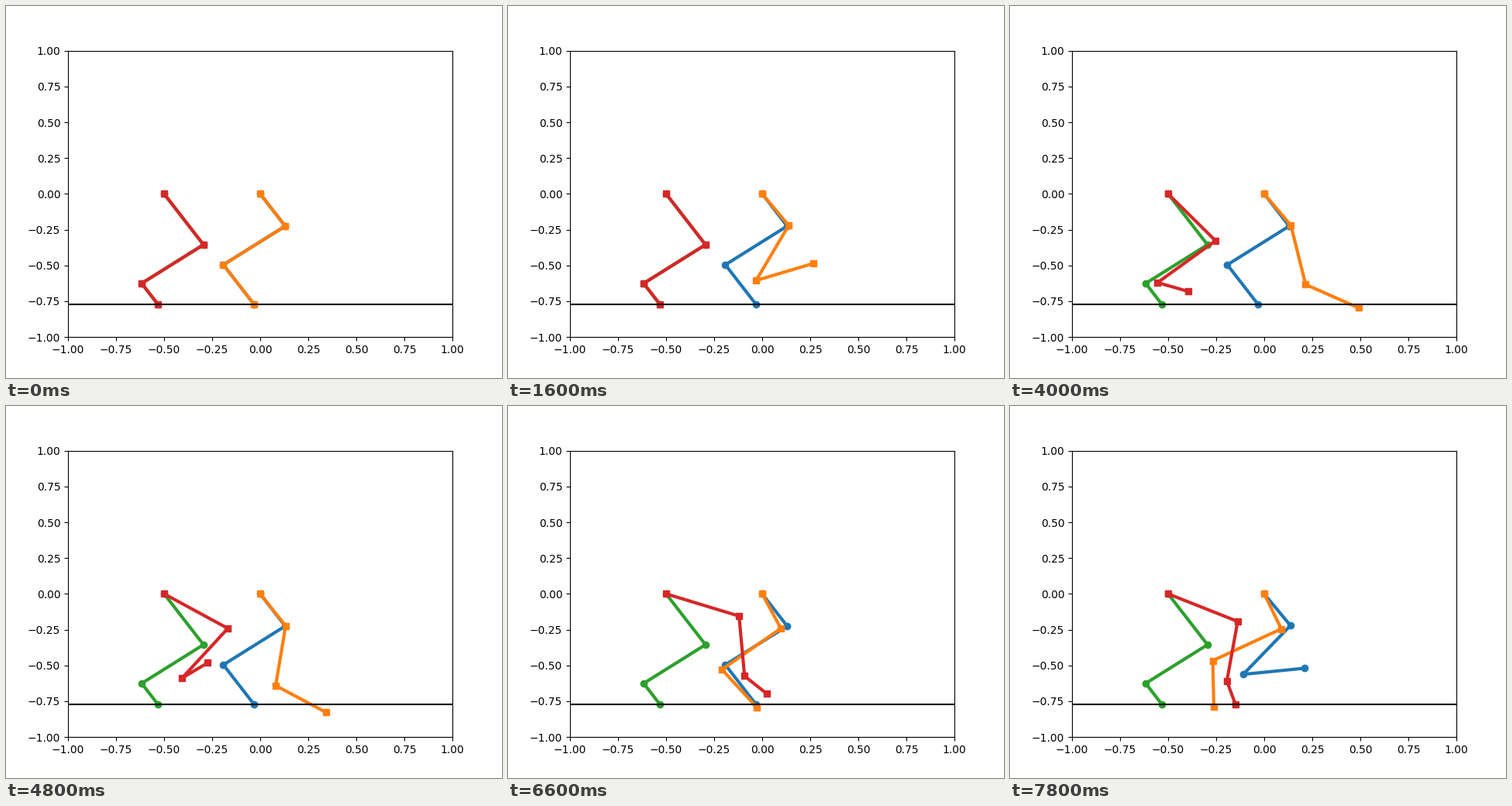
These frames come from a looping animation (640x480 px, 8 s). A matplotlib script:

```python
import numpy as np
import matplotlib.pyplot as plt
from matplotlib.animation import FuncAnimation

FRAMES, STEP_MS = 40, 200
QUARTER = 16  # steps between the starts of successive legs
STAND = (-60, -80, 80)

# Key poses by step: (hip, knee, ankle) in degrees, each relative to the link before.
FRONT_GAIT = {
    1: STAND,
    7: (-58.3, -67.5, 133.4), 8: (-58, -55.8, 135.6),  # lift
    15: (-57.3, -30.5, 83.4), 19: (-57.5, -20.5, 50.5),  # reach
    24: (-59.4, -37.7, 61.6), 29: (-65.1, -56.6, 82.4),  # push back
    33: (-68.1, -68.8, 81.4), 39: (-70, -78.1, 59.1),
}
REAR_GAIT = {
    1: STAND,
    8: (-36, -88.5, 162.9),  # lift
    13: (-20.1, -88.7, 95.9), 17: (-22.2, -63.9, 39.3),  # reach
    23: (-28, -69.7, 23),  # push back
}


def gait_angles(gait, step):
    """Smooth curve through the key poses, starting from rest."""
    keys = np.array(list(gait), float)
    poses = np.array(list(gait.values()), float)
    slopes = np.gradient(poses, keys, axis=0)
    slopes[0] = 0
    step = np.clip(step, keys[0], keys[-1])
    i = min(np.searchsorted(keys, step, side="right"), len(keys) - 1) - 1
    span = keys[i + 1] - keys[i]
    u = (step - keys[i]) / span
    ease = u * u * (3 - 2 * u)
    bend = slopes[i] * u * (1 - u) ** 2 - slopes[i + 1] * u * u * (1 - u)
    return poses[i] * (1 - ease) + poses[i + 1] * ease + span * bend


def joints(hip_x, lengths, angles):
    heading = np.radians(np.cumsum(angles))
    x = hip_x + np.r_[0, np.cumsum(lengths * np.cos(heading))]
    y = np.r_[0, np.cumsum(lengths * np.sin(heading))]
    return x, y


class Leg:
    def __init__(self, ax, hip_x, lengths, gait, delay, style, color):
        self.hip_x, self.lengths = hip_x, lengths
        self.gait, self.delay = gait, delay
        self.line, = ax.plot([], [], style, color=color, lw=3)

    def pose(self, frame):
        angles = gait_angles(self.gait, frame - self.delay)
        self.line.set_data(*joints(self.hip_x, self.lengths, angles))


fig, ax = plt.subplots(figsize=(6.4, 4.8), dpi=100)
ax.set_xlim(-1, 1)
ax.set_ylim(-1, 1)

front = (0, (0.26, 0.42, 0.32), FRONT_GAIT)
rear = (-0.5, (0.41, 0.42, 0.17), REAR_GAIT)
legs = [
    Leg(ax, *front, 2 * QUARTER, "o-", "tab:blue"),
    Leg(ax, *front, 0, "s-", "tab:orange"),
    Leg(ax, *rear, 3 * QUARTER, "o-", "tab:green"),
    Leg(ax, *rear, QUARTER, "s-", "tab:red"),
]
ground = joints(*front[:2], STAND)[1][-1]
ax.plot([-1, 1], [ground, ground], color="black")


def update(frame):
    for leg in legs:
        leg.pose(frame)
    return [leg.line for leg in legs]


anim = FuncAnimation(fig, update, frames=FRAMES, interval=STEP_MS,
                     repeat=True, repeat_delay=0)
plt.show()
```
